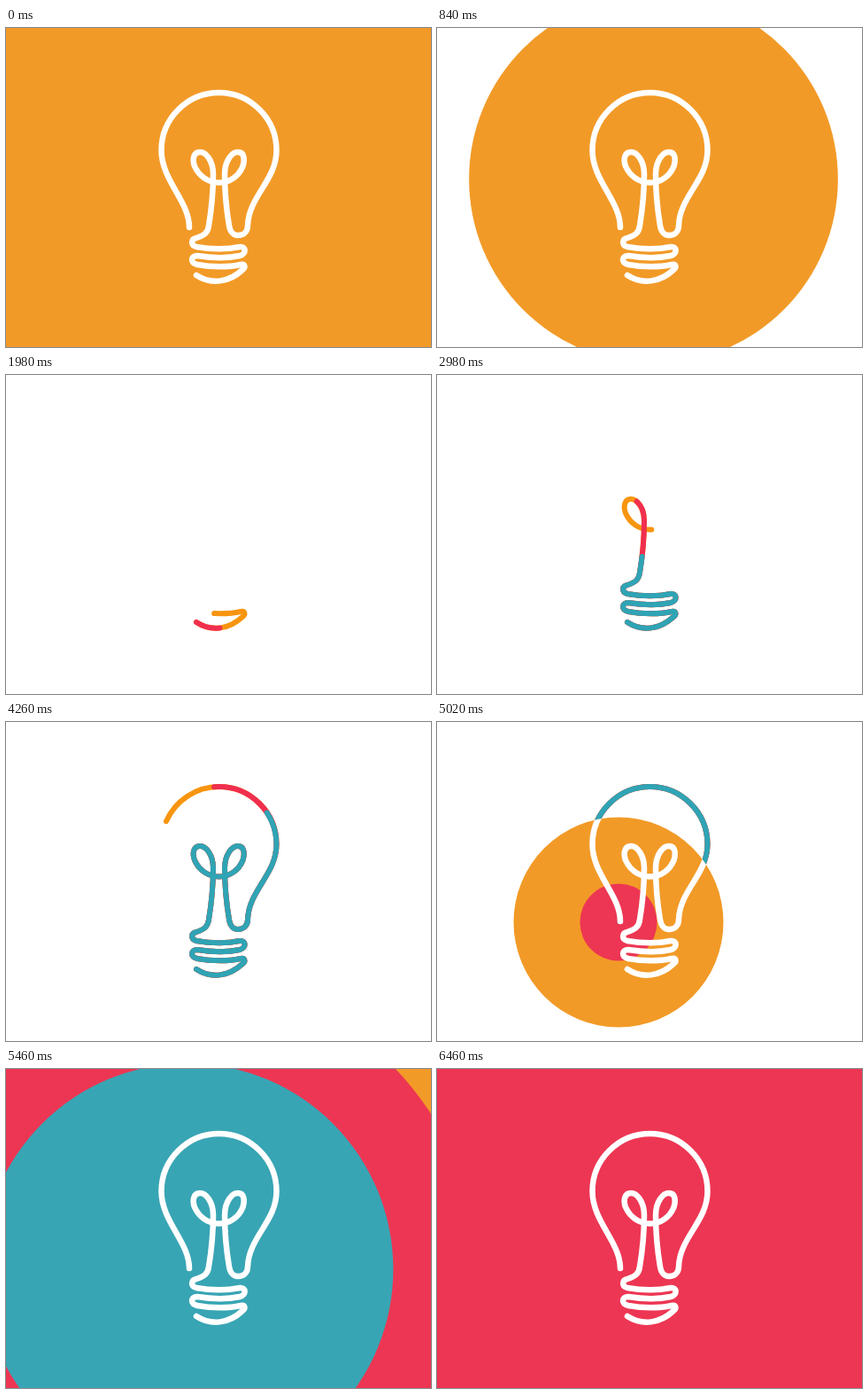
Recreate the animation shown at these times as an HTML page with a canvas. Size 480 by 360 pixels, loop 7260 ms.

```html
<!DOCTYPE html>
<html lang="en">
<head>
<meta charset="utf-8">
<title>Light bulb line drawing</title>
<style>
  html, body { margin: 0; width: 100%; height: 100%; overflow: hidden; background: #fff; }
  canvas { display: block; width: 480px; height: 360px; }
</style>
</head>
<body>
<canvas id="stage" width="480" height="360"></canvas>
<script>
const LOOP = 7260;
const STEP = 40;
const DRAW_START = 1740;
const ORANGE = '#f29a27', RED = '#ed3653', TEAL = '#38a5b4';
const ctx = document.getElementById('stage').getContext('2d');

// The bulb is one line in four parts; the pen reaches each part's end at the given time.
const parts = [
  { end: 2460, d: `M215 279 C232 290 252 287 267 273 C271 270 270 266 265 267
    C252 270 232 270 216 267 C208 265 208 257 216 257 C232 259.5 250 260 264 257
    C272 255 271 246 264 247 C250 250 232 250 215 247 C208 245 209 238 215 237` },
  { end: 2980, d: `C224 234 228 231 229 223 C232 205 234 185 234 165
    C234 150 226 140 219 140 C212 140 210 148 213 156 C218 167 228 174.5 240.5 174.5` },
  { end: 4052, d: `C253 174.5 263 167 267.5 156 C270 148 269 140 262 140
    C255 140 247 150 247 165 C247 185 249 205 252 223 C253 230 257 234 262 234
    C268 234 273 230 273 223 C274 190 305.5 172 305.5 138 C305.5 102 276 73 240.5 73` },
  { end: 4612, d: 'C205 73 175.5 102 175.5 138 C175.5 172 207 195 207 225' }
];

const probe = document.createElementNS('http://www.w3.org/2000/svg', 'path');
let outline = '';
const keys = [[1700, 0]];
for (const part of parts) {
  outline += part.d + ' ';
  probe.setAttribute('d', outline);
  keys.push([part.end, probe.getTotalLength()]);
}
const bulb = new Path2D(outline);

// Layers from back to front: pen delay, start of the disc, colours.
const layers = [
  { delay: 0, burst: 4740, line: '#f7950f', fill: ORANGE },
  { delay: 200, burst: 4883, line: '#f02f4f', fill: RED },
  { delay: 400, burst: 5007, line: '#2fa4b5', fill: TEAL }
];

function penLength(t) {
  if (t <= keys[0][0]) return 0;
  for (let i = 1; i < keys.length; i++) {
    const [t0, a] = keys[i - 1], [t1, b] = keys[i];
    if (t < t1) return a + (b - a) * (t - t0) / (t1 - t0);
  }
  return keys[keys.length - 1][1] + 10;
}

const burstRadius = age => age > 0 ? 252 * Math.pow(age / 480, 1.4) : 0;

function strokeBulb(color, width, length) {
  ctx.strokeStyle = color;
  ctx.lineWidth = width;
  ctx.setLineDash(length === undefined ? [] : [length, 3000]);
  ctx.stroke(bulb);
}

function disc(x, y, r, color) {
  ctx.beginPath();
  ctx.arc(x, y, r, 0, Math.PI * 2);
  ctx.fillStyle = color;
  ctx.fill();
}

function whiteBulbInside(x, y, r) {
  ctx.save();
  ctx.beginPath();
  ctx.arc(x, y, r, 0, Math.PI * 2);
  ctx.clip();
  strokeBulb('#fff', 6.5);
  ctx.restore();
}

function badge(x, y, r, color) {
  disc(x, y, r, color);
  whiteBulbInside(x, y, r);
}

function drawLines(t) {
  for (const { delay, line } of layers) {
    const length = penLength(t - delay);
    if (length > 0) strokeBulb(line, 6, length);
  }
}

function drawBursts(t) {
  const x = 205, y = 226;
  for (const { burst, fill } of layers) {
    const r = burstRadius(t - burst);
    if (r > 0) disc(x, y, r, fill);
  }
  const outer = burstRadius(t - layers[0].burst);
  if (outer > 0) whiteBulbInside(x, y, outer);
}

function render(t) {
  ctx.fillStyle = '#fff';
  ctx.fillRect(0, 0, 480, 360);
  ctx.lineCap = ctx.lineJoin = 'round';
  if (t < 800) {
    badge(240, 180, 400, ORANGE);
  } else if (t < 1240) {
    badge(244.5, 170.5, 300 * Math.pow((1240 - t) / 480, 2), ORANGE);
  } else if (t >= 6460) {
    badge(240, 180, 400, RED);
  } else if (t >= DRAW_START) {
    drawLines(t);
    drawBursts(t);
  }
}

const begin = performance.now();

function tick() {
  const t = (performance.now() - begin) % LOOP;
  const base = t < DRAW_START ? 0 : DRAW_START;
  render(base + Math.floor((t - base) / STEP) * STEP);
  requestAnimationFrame(tick);
}
tick();
</script>
</body>
</html>
```
